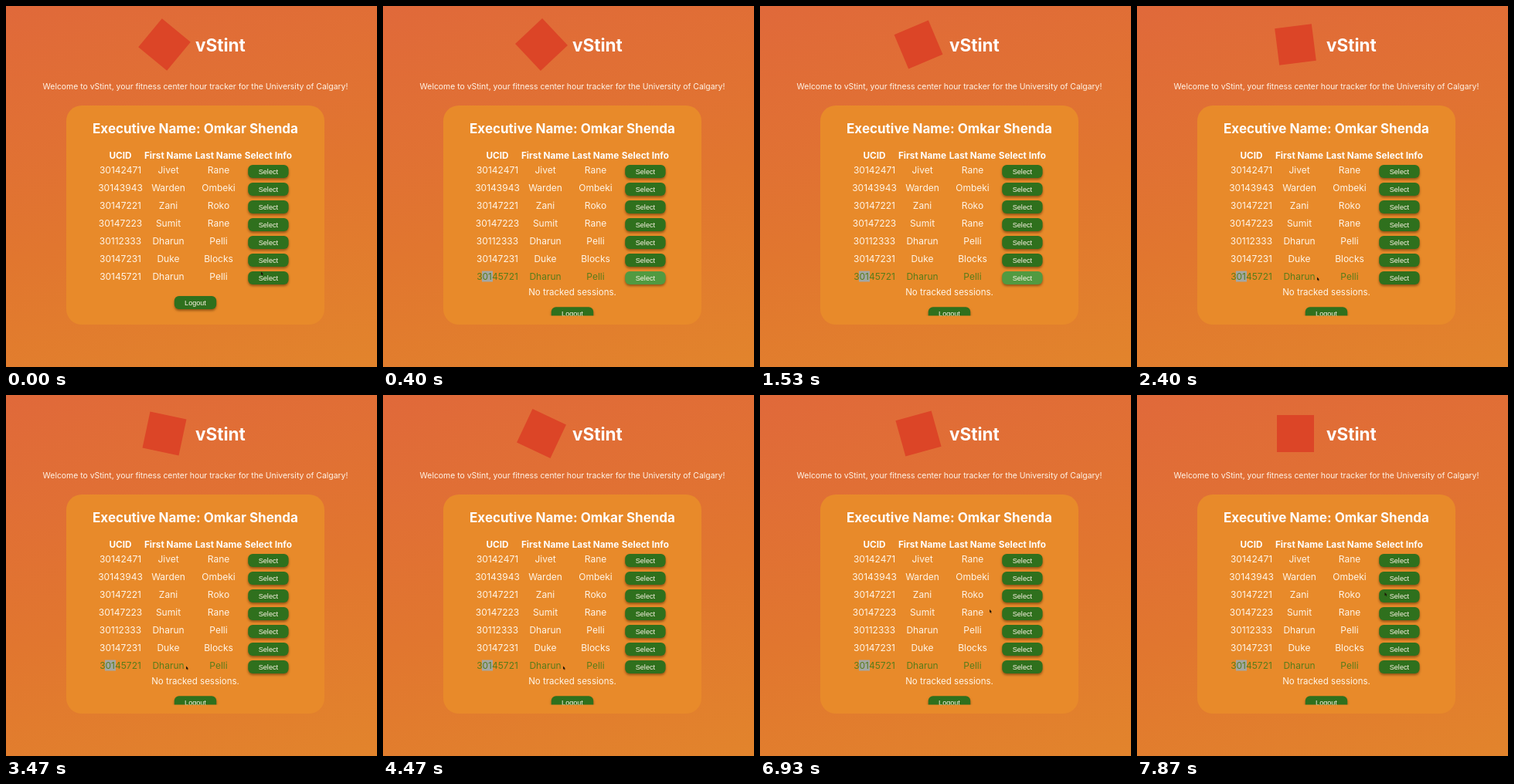
Recreate the animation shown at these times as an HTML page. Size 480 by 468 pixels, loop 8000 ms.

```html
<!DOCTYPE html>
<html lang="en">
<head>
<meta charset="utf-8">
<style>
  html, body { margin: 0; width: 100%; height: 100%; overflow: hidden; }
  body { background: linear-gradient(165deg, #e0693a, #e1762f 55%, #e2842c); }
  svg { display: block; width: 480px; height: 468px; }
  text { font: 12px Inter, sans-serif; fill: #fff5e8; text-anchor: middle; }
  .title { font-size: 22.5px; font-weight: 700; text-anchor: start; fill: #fff; }
  .intro { font-size: 10.42px; }
  .heading { font-size: 17px; font-weight: 700; fill: #fff; }
  .column { font-size: 11.75px; font-weight: 700; fill: #fff; }
  .button rect { fill: #2f701d; filter: drop-shadow(0 2px 1.5px rgba(60, 30, 0, .5)); }
  .button text { font: 9.1px "Liberation Sans", Arial, sans-serif; }
  .open text { fill: #587c1a; }
</style>
</head>
<body>
<svg viewBox="0 0 480 468">
  <clipPath id="fold"><rect x="78" y="129" width="334" height="272.6"/></clipPath>
  <rect id="logo" x="181" y="26" width="48" height="48" fill="#dc4527"/>
  <text class="title" x="245" y="58.5">vStint</text>
  <text class="intro" x="245" y="107.5">Welcome to vStint, your fitness center hour tracker for the University of Calgary!</text>
  <rect x="78" y="129" width="334" height="284" rx="20" fill="#e88a2a"/>
  <text class="heading" x="245" y="164.5">Executive Name: Omkar Shenda</text>
  <g id="table"></g>
  <text id="message" x="245" y="374.5" style="font-size:11.5px">No tracked sessions.</text>
  <g clip-path="url(#fold)"><g id="logout"></g></g>
  <path id="cursor" d="M0 0V4.2L1 3.3L1.8 5L2.6 4.6L1.9 3.1H3Z" fill="#1c1408"/>
</svg>
<script>
const $ = id => document.getElementById(id);

const people = [
  ['30142471', 'Jivet', 'Rane'],
  ['30143943', 'Warden', 'Ombeki'],
  ['30147221', 'Zani', 'Roko'],
  ['30147223', 'Sumit', 'Rane'],
  ['30112333', 'Dharun', 'Pelli'],
  ['30147231', 'Duke', 'Blocks'],
  ['30145721', 'Dharun', 'Pelli']
];
const columns = [148, 210, 275, 339.4];

const label = (x, y, text, cls = '') => `<text class="${cls}" x="${x}" y="${y}">${text}</text>`;
const button = (x, y, w, text) => `<g class="button">
  <rect x="${x - w / 2}" y="${y}" width="${w}" height="17" rx="6"/>${label(x, y + 11.6, text)}</g>`;

$('table').innerHTML =
  ['UCID', 'First Name', 'Last Name', 'Select Info']
    .map((name, i) => label(columns[i], 197.8, name, 'column')).join('') +
  '<rect id="selection" x="128" y="343.5" width="14" height="14" fill="#a3a8a5"/>' +
  people.map((person, row) => {
    const y = 217.3 + row * 23;
    return `<g class="row">${person.map((cell, i) => label(columns[i], y, cell)).join('')}</g>` +
      button(columns[3], y - 11.4, 52.4, 'Select');
  }).join('');
$('logout').innerHTML = button(245, 376, 54.4, 'Logout');

const lastRow = [...document.querySelectorAll('.row')].pop();
const lastButton = lastRow.nextElementSibling.querySelector('rect');

const LOOP = 8000, CLICK = 400, LEAVE = 1900;

// The screen refreshes only inside these spans and holds between them
const active = [[70, 870], [930, 1530], [1670, 2470], [2530, 2600], [3070, 3130],
  [3470, 4200], [5200, 5330], [5470, 5530], [6130, 6930], [7000, 7800]];

// time, x, y
const path = [[0, 330, 344.5], [1700, 330, 350], [2200, 233, 351.5], [6060, 233, 351.5],
  [6200, 221.5, 302], [6930, 297, 278], [7800, 320.5, 256]];

const clamp = v => Math.max(0, Math.min(1, v));

function heldTime(t) {
  let held = 0;
  for (const [start, end] of active) if (t >= start) held = Math.min(t, end);
  return Math.floor((held + 5) * 0.015) / 0.015;
}

function cursorAt(t) {
  const next = path.findIndex(p => p[0] > t);
  if (next < 0) return path[path.length - 1].slice(1);
  const a = path[next - 1], b = path[next], k = (t - a[0]) / (b[0] - a[0]);
  const ease = k * k * (3 - 2 * k);
  return [a[1] + (b[1] - a[1]) * ease, a[2] + (b[2] - a[2]) * ease];
}

function draw(now) {
  const t = heldTime(now % LOOP);
  const open = t >= CLICK;
  const hover = clamp((t - 200) / 200) * clamp((LEAVE + 200 - t) / 200);
  const shown = open ? 'visible' : 'hidden';

  $('logo').setAttribute('transform', `rotate(${(t - 7800) * 0.018} 205 50)`);
  lastRow.classList.toggle('open', open);
  $('message').style.visibility = shown;
  $('selection').style.visibility = shown;
  $('logout').setAttribute('transform', `translate(0 ${open ? 14.2 : 0})`);
  lastButton.style.fill = `rgb(${47 + 34 * hover}, ${112 + 42 * hover}, ${29 + 36 * hover})`;
  $('cursor').setAttribute('transform', `translate(${cursorAt(t)})`);
  $('cursor').style.visibility = hover > 0.5 ? 'hidden' : 'visible';
  requestAnimationFrame(draw);
}
requestAnimationFrame(draw);
</script>
</body>
</html>
```
